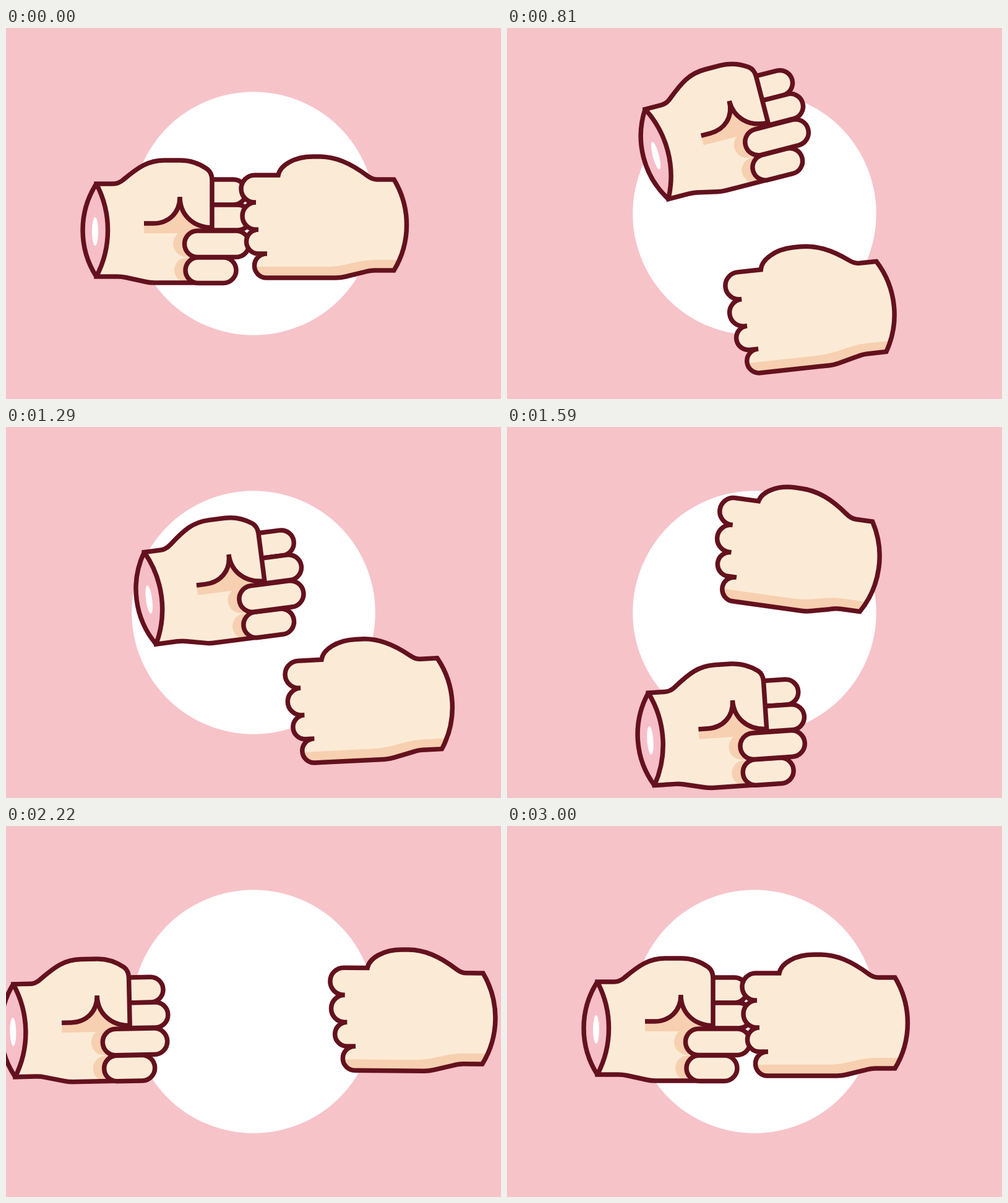
An HTML page for the animation above (3.06 s loop, 800 by 600 pixels).

```html
<!DOCTYPE html>
<html lang="en">
<head>
<meta charset="utf-8">
<title>Fist bump</title>
<style>
  html, body { margin: 0; width: 100%; height: 100%; overflow: hidden; background: #f6c3c9; }
  svg { display: block; width: 100vw; height: 100vh; }
  .line { stroke: #64111e; stroke-width: 7.5; }
  .skin { fill: #fbebd6; }
  .shade { fill: #f6d0b0; }
  .none { fill: none; }
</style>
</head>
<body>
<svg viewBox="0 0 800 600">
  <defs>
    <path id="palm" d="M310 412H240Q232 412 226 410.500L194 403.500Q187 402 180 402H146V252H173Q182 252 190 245C214 225 230 214 256 214H282C300 214 315 221 325 228Q333 234 333 246V324"/>
    <path id="back" d="M627 245H600Q592 245 584 239C556 218 532 208 506 208H496C466 208 443 222 440 238H402a22 22 0 0 0 0 44h2a22 22 0 0 0 0 44h4a19.500 19.500 0 0 0 0 39h14h-1a19.500 19.500 0 0 0 0 39H533Q541 404 549 402L578 395Q588 392 596 392H627A142 142 0 0 0 627 245Z"/>
  </defs>
  <circle cx="400" cy="300" r="196.800" fill="#fff"/>

  <g id="left">
    <g class="skin line">
      <path d="M333 245H367.500a20.500 20.500 0 0 1 0 41H333"/>
      <path d="M333 286H374.500a20.500 20.500 0 0 1 0 41H333"/>
    </g>
    <use href="#palm" class="skin"/>
    <g class="shade">
      <path d="M223 316H238C262 316 281 300 281 273C281 300 300 324 333 324V332H223Z"/>
      <rect x="270" y="328" width="60" height="42" rx="21"/>
      <rect x="272" y="371" width="60" height="41" rx="20.500"/>
    </g>
    <use href="#palm" class="none line"/>
    <path class="none line" d="M223 316H238C262 316 281 300 281 273M281 273C281 300 300 323 335 323"/>
    <g class="skin line">
      <rect x="290" y="371" width="82" height="41.500" rx="20.700"/>
      <rect x="288.500" y="328" width="104.500" height="42.500" rx="21.200"/>
    </g>
    <path class="line" fill="#f6bfc8" stroke-linejoin="bevel" d="M146 252A139 139 0 0 0 146 402A161 161 0 0 0 146 252Z"/>
    <ellipse cx="144" cy="329" rx="5" ry="23" fill="#fff"/>
  </g>

  <g id="right">
    <use href="#back" class="skin"/>
    <path class="shade" d="M403 386H518C550 386 566 375 598 375H636L627 392H596Q588 392 578 395L549 402Q541 404 533 404H421Q406 404 403 386Z"/>
    <use href="#back" class="none line"/>
  </g>
</svg>
<script>
  const LOOP = 3060, STEP = 30, BEGIN = 90, END = 3000;
  // Three bumps in equal time: each swings apart, hits and bounces back.
  const FIRST = 720, PERIOD = 760, HIT = 170, RECOIL = 390;
  const BOUNCE = [.88, .6, .3];
  const REST = [0, 0, 0];

  // A pose is x, y and the angle about the middle of the wrist.
  const hands = [
    { id: 'left', pivot: [146, 327], home: [8, 16, 0], bumps: [
      { via: [24, -43, -18], apart: [94, -148, -14.5], meet: [101, -59, -14.5] },
      { via: [84, -120, -5], apart: [84, 205, -4], meet: [92, 140, -3.5] },
      { via: [95, 200, -2.5], apart: [-136, 1, -1.2], meet: [4, 4, 0] }
    ] },
    { id: 'right', pivot: [627, 318.5], home: [46, -5, 0], bumps: [
      { via: [62, -4, -10.7], apart: [-19, 153, -6.4], meet: [-30, 78, -5.8] },
      { via: [179, 243, -6], apart: [-44, -138, 8], meet: [-50, -30, 8] },
      { via: [-36, 137, 7], apart: [146, -9, .4], meet: [-4, 0, 0] }
    ] }
  ];

  const mix = (a, b, u) => a.map((v, i) => v + (b[i] - v) * u);
  const arc = (a, via, b, u) => mix(mix(a, via, u), mix(via, b, u), u);
  const part = (t, from, to) => Math.min(1, Math.max(0, (t - from) / (to - from)));
  const sway = u => (1 - Math.cos(Math.PI * u)) / 2;

  function pose({ bumps, home }, t) {
    let from = REST, start = BEGIN;
    for (const [i, { via, apart, meet }] of bumps.entries()) {
      const top = FIRST + i * PERIOD, hit = top + HIT, end = top + RECOIL;
      if (t < top) return arc(from, via, apart, sway(part(t, start, top)));
      if (t < hit) return mix(apart, meet, part(t, top, hit) ** 2);
      from = mix(meet, apart, BOUNCE[i]);
      if (t < end) return mix(meet, from, 1 - (1 - part(t, hit, end)) ** 2);
      start = end;
    }
    return arc(from, home, REST, sway(part(t, start, END)));
  }

  const origin = performance.now();
  function draw() {
    const now = Math.max(0, performance.now() - origin) % LOOP;
    const t = Math.floor(now / STEP) * STEP;
    for (const hand of hands) {
      const [x, y, angle] = pose(hand, t);
      document.getElementById(hand.id)
        .setAttribute('transform', `translate(${x} ${y}) rotate(${angle} ${hand.pivot})`);
    }
    requestAnimationFrame(draw);
  }
  draw();
</script>
</body>
</html>
```
